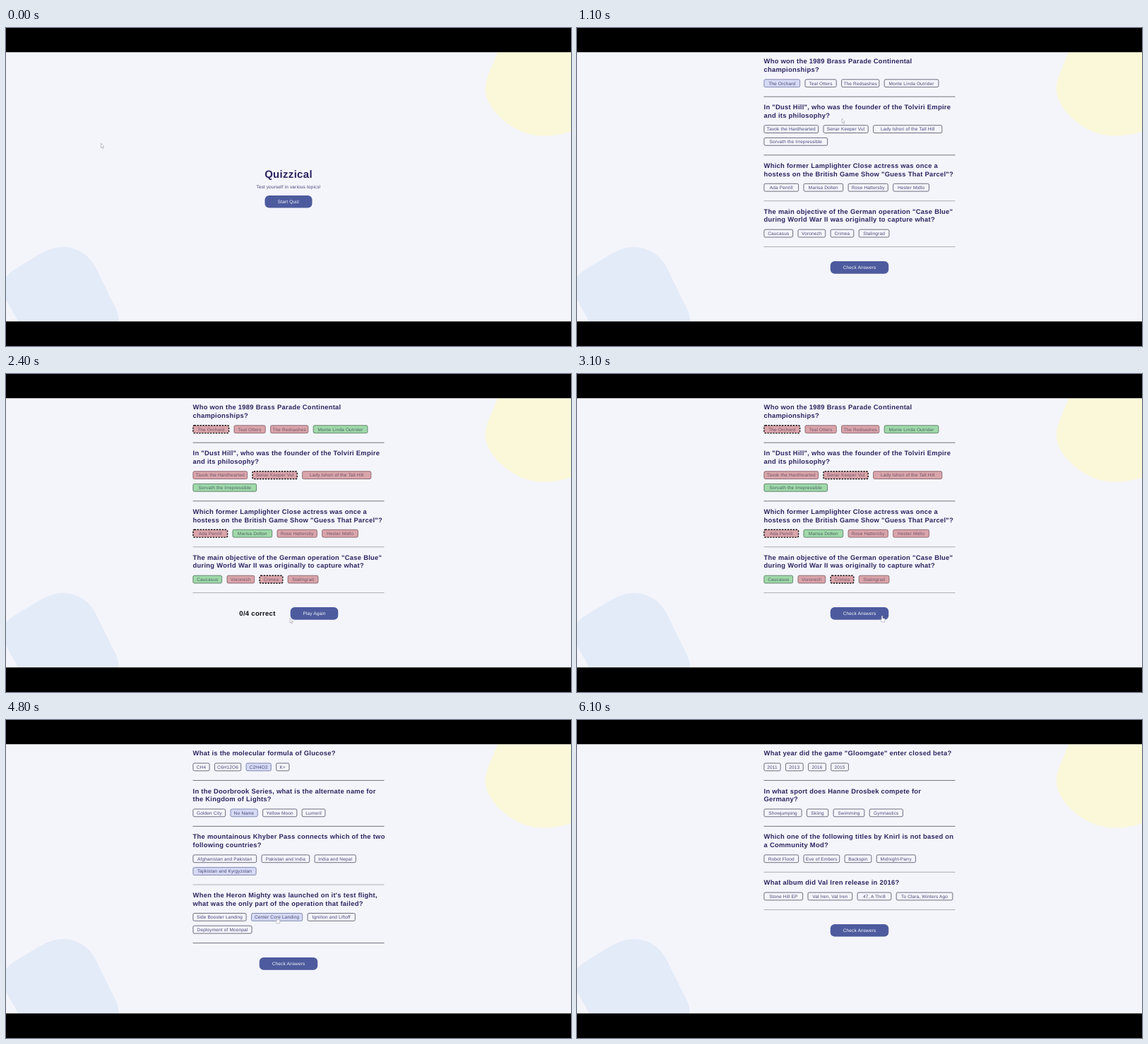
Write an HTML page that moves like this. It is 800 px wide and 450 px high and loops after 6400 ms.

```html
<!DOCTYPE html>
<html lang="en">
<head>
<meta charset="utf-8">
<title>Quiz</title>
<style>
html, body { margin: 0; width: 100%; height: 100%; overflow: hidden; background: #000; }
svg { display: block; width: 100vw; height: 100vh; }
text {
  font: 6.5px "Liberation Sans", Arial, sans-serif;
  letter-spacing: .15px;
  text-rendering: geometricPrecision;
  fill: #494779;
}
.mid { text-anchor: middle; }
.head { font-size: 9.4px; font-weight: 700; letter-spacing: .28px; fill: #2b2560; }
.title { font-size: 15px; font-weight: 700; letter-spacing: .3px; fill: #2b2560; }
.score { font-size: 9.5px; font-weight: 700; letter-spacing: .3px; fill: #0c0c12; }
.button rect { fill: #4d5b9e; }
.button text { fill: #f5f7fb; }
.rule { stroke: #55555f; stroke-width: .8; }
.faint { stroke: #9a9ba4; }
.chip rect { fill: none; stroke: #4c4c60; stroke-width: .8; }
.chip.picked rect { fill: #d6dbf5; stroke: #6a719f; }
.chip.right rect { fill: #a0d9a9; stroke: #4c6e58; }
.chip.wrong rect { fill: #d9a5aa; stroke: #79555d; }
.chip.right text { fill: #4a6365; }
.chip.wrong text { fill: #73536a; }
.chip.dash rect { stroke: #111; stroke-width: 1.4; stroke-dasharray: 2.3 1.6; }
#cursor path { fill: #fafafd; stroke: #9b9ba6; stroke-width: .55; stroke-linejoin: round; }
</style>
</head>
<body>
<svg id="stage" viewBox="0 0 800 450">
  <rect width="800" height="450" fill="#f4f5fb"/>
  <path fill="#fbf8da" d="M696 34C689 55 678.5 70 678.5 87C680 115 712 142 740 150C762 155 785 152 800 146V30H697Z"/>
  <path fill="#e3ebf8" d="M0 352Q4 347 10 343L46 321C60 313 70 310 82 310C103 311 118 322 127 339L150 386C156 396 160 405 160 418H18C13 405 6 397 0 384Z"/>
  <path d="M0 0H800V34.3H0ZM0 415.3H800V450H0Z"/>
  <g id="screens"></g>
  <g id="cursor">
    <path id="arrow" d="M0 0V6.6L1.5 5.3L2.6 7.8L3.6 7.3L2.6 5H4.5Z"/>
    <path id="hand" d="M-.8.6Q0-.5.8.6V3.6L3.6 4.2Q4.3 4.5 4.1 5.4L3.4 9H-.8L-2.8 5.8Q-2.6 4.6-.8 5.8Z"/>
  </g>
</svg>
<script>
const LOOP = 6400, STEP = 100, LEFT = 264.5, RIGHT = 535.5, GAP = 6.6;
const $ = id => document.getElementById(id);

// chips: [label, box width]; pick: chosen index; at: time of the choice
const quizzes = [
  { from: 600, reveal: 2300, reset: 2900, score: "0/4 correct", scoreX: 356, againX: 436.5, faint: [2, 3], questions: [
    { lines: ["Who won the 1989 Brass Parade Continental", "championships?"], answer: 3, pick: 0, at: 900,
      chips: [["The Orchard", 51.5], ["Teal Otters", 45], ["The Redsashes", 54], ["Monte Linda Outrider", 77.5]] },
    { lines: ['In "Dust Hill", who was the founder of the Tolviri Empire', "and its philosophy?"], answer: 3, pick: 1, at: 1300,
      chips: [["Tavok the Hardhearted", 77.5], ["Senar Keeper Vul", 64], ["Lady Ishori of the Tall Hill", 98], ["Sorvath the Irrepressible", 90.5]] },
    { lines: ["Which former Lamplighter Close actress was once a", 'hostess on the British Game Show "Guess That Parcel"?'], answer: 1, pick: 0, at: 1700,
      chips: [["Ada Penrill", 49.5], ["Marisa Dolten", 56.5], ["Rose Hattersby", 57], ["Hester Midlo", 51.5]] },
    { lines: ['The main objective of the German operation "Case Blue"', "during World War II was originally to capture what?"], answer: 0, pick: 2, at: 2000,
      chips: [["Caucasus", 41.5], ["Voronezh", 39.5], ["Crimea", 33.5], ["Stalingrad", 43.5]] }
  ] },
  { from: 3300, reveal: 5200, reset: 5600, score: "1/4 correct", scoreX: 356, againX: 434.8, faint: [2], questions: [
    { lines: ["What is the molecular formula of Glucose?"], answer: 1, pick: 2, at: 3800,
      chips: [["CH4", 24], ["C6H12O6", 38], ["C2H4O2", 36], ["K+", 19]] },
    { lines: ["In the Doorbrook Series, what is the alternate name for", "the Kingdom of Lights?"], answer: 3, pick: 1, at: 4100,
      chips: [["Golden City", 46.5], ["No Name", 39], ["Yellow Moon", 49], ["Lumeril", 33.5]] },
    { lines: ["The mountainous Khyber Pass connects which of the two", "following countries?"], answer: 0, pick: 3, at: 4400,
      chips: [["Afghanistan and Pakistan", 90.5], ["Pakistan and India", 68.5], ["India and Nepal", 59], ["Tajikistan and Kyrgyzstan", 90]] },
    { lines: ["When the Heron Mighty was launched on it's test flight,", "what was the only part of the operation that failed?"], answer: 1, pick: 1, at: 4800,
      chips: [["Side Booster Landing", 76], ["Center Core Landing", 73], ["Ignition and Liftoff", 68], ["Deployment of Moonpal", 84]] }
  ] },
  { from: 5900, faint: [2, 3], questions: [
    { lines: ['What year did the game "Gloomgate" enter closed beta?'],
      chips: [["2011", 24], ["2013", 25.5], ["2016", 25.5], ["2015", 25.5]] },
    { lines: ["In what sport does Hanne Drosbek compete for", "Germany?"],
      chips: [["Showjumping", 54], ["Skiing", 31], ["Swimming", 44.5], ["Gymnastics", 48]] },
    { lines: ["Which one of the following titles by Knirl is not based on", "a Community Mod?"],
      chips: [["Robot Flood", 49.5], ["Eve of Embers", 51.5], ["Backspin", 38.5], ["Midnight-Parry", 56]] },
    { lines: ["What album did Val Iren release in 2016?"],
      chips: [["Stone Hill EP", 55.5], ["Val Iren, Val Iren", 63.5], ["47, A Thrill", 48.5], ["To Clara, Winters Ago", 80.5]] }
  ] }
];

// pointer stops: [time, x, y]
const stops = [
  [0, 134.5, 163], [400, 397, 244], [600, 397, 244], [850, 292, 76], [900, 292, 76],
  [1100, 375, 128], [1250, 380, 141], [1300, 380, 141], [1650, 290, 224], [1700, 290, 224],
  [1950, 376, 288], [2000, 376, 288], [2250, 401, 340], [2400, 402, 345.5], [2700, 432, 342],
  [3500, 432, 342], [3750, 357, 66], [3800, 357, 66], [4000, 339, 133.5], [4100, 339, 133.5],
  [4350, 310, 213], [4400, 310, 213], [4750, 384, 279], [4800, 384, 279], [5150, 401, 345],
  [5300, 402.5, 345], [5500, 421, 349], [6000, 421, 349]
];

function add(parent, tag, attrs, text) {
  const node = document.createElementNS("http://www.w3.org/2000/svg", tag);
  for (const key in attrs) node.setAttribute(key, attrs[key]);
  if (text) node.textContent = text;
  return parent.appendChild(node);
}

const show = (node, on) => { node.style.display = on ? "" : "none"; };

// a labelled rounded box that remembers its bounds
function box(parent, name, cx, cy, w, h, r, label) {
  const node = add(parent, "g", { class: name });
  add(node, "rect", { x: cx - w / 2, y: cy - h / 2, width: w, height: h, rx: r });
  add(node, "text", { class: "mid", x: cx, y: cy + 2.3 }, label);
  return { node, has: (x, y) => Math.abs(x - cx) <= w / 2 && Math.abs(y - cy) <= h / 2 };
}

const button = (parent, cx, cy, w, label) => box(parent, "button", cx, cy, w, 17.6, 6, label);

function buildIntro() {
  const group = add($("screens"), "g");
  add(group, "text", { class: "title mid", x: 400, y: 211.8 }, "Quizzical");
  add(group, "text", { class: "mid", x: 400, y: 227.2 }, "Test yourself in various topics!");
  return { group, from: 0, start: button(group, 400, 245.8, 67, "Start Quiz") };
}

function buildQuiz(quiz) {
  const group = quiz.group = add($("screens"), "g");
  let y = 47;
  quiz.questions.forEach((q, i) => {
    q.lines.forEach((line, n) =>
      add(group, "text", { class: "head", x: LEFT, y: y + 3.3 + n * 11.7 }, line));
    y += q.lines.length * 11.7 + 7.8;
    let x = LEFT;
    q.boxes = q.chips.map(([label, w]) => {
      if (x + w > RIGHT) { x = LEFT; y += 17.7; }
      const chip = box(group, "chip", x + w / 2, y, w - .8, 10.8, 1.8, label);
      x += w + GAP;
      return chip;
    });
    y += 19;
    const tone = quiz.faint.includes(i) ? "rule faint" : "rule";
    add(group, "line", { class: tone, x1: LEFT, x2: RIGHT, y1: y, y2: y });
    y += 14.7;
  });
  y += 14.6;
  quiz.check = button(group, 400, y, 82.5, "Check Answers");
  if (quiz.score) {
    quiz.again = button(group, quiz.againX, y, 67.6, "Play Again");
    quiz.total = add(group, "text", { class: "score mid", x: quiz.scoreX, y: y + 3.3 }, quiz.score);
  }
  return quiz;
}

const screens = [buildIntro(), ...quizzes.map(buildQuiz)];

function chipClass(q, i, t, revealed) {
  const picked = i === q.pick && t >= q.at;
  if (!revealed) return picked ? "chip picked" : "chip";
  return "chip " + (i === q.answer ? "right" : "wrong") + (picked ? " dash" : "");
}

// updates one quiz and returns the boxes that can be clicked
function drawQuiz(quiz, t) {
  const revealed = t >= quiz.reveal;
  const done = revealed && t < quiz.reset;
  show(quiz.check.node, !done);
  if (quiz.again) {
    show(quiz.again.node, done);
    show(quiz.total, done);
  }
  for (const q of quiz.questions)
    q.boxes.forEach((chip, i) => chip.node.setAttribute("class", chipClass(q, i, t, revealed)));
  return [done ? quiz.again : quiz.check, ...quiz.questions.flatMap(q => q.boxes)];
}

function pointer(t) {
  const i = stops.findIndex(stop => stop[0] > t);
  if (i < 0) return null;
  const [t0, x0, y0] = stops[i - 1], [t1, x1, y1] = stops[i];
  const p = (t - t0) / (t1 - t0), k = p * p * (3 - 2 * p);
  return [x0 + (x1 - x0) * k, y0 + (y1 - y0) * k];
}

function draw(t) {
  const current = screens.filter(s => t >= s.from).pop();
  for (const s of screens) show(s.group, s === current);
  const targets = current.start ? [current.start] : drawQuiz(current, t);
  const pos = pointer(t);
  const over = pos && targets.some(target => target.has(...pos));
  show($("arrow"), pos && !over);
  show($("hand"), over);
  if (pos) $("cursor").setAttribute("transform", `translate(${pos})`);
}

const begin = performance.now();
function tick() {
  const t = (performance.now() - begin) % LOOP;
  draw(Math.floor(t / STEP) * STEP);
  requestAnimationFrame(tick);
}
tick();
</script>
</body>
</html>
```
